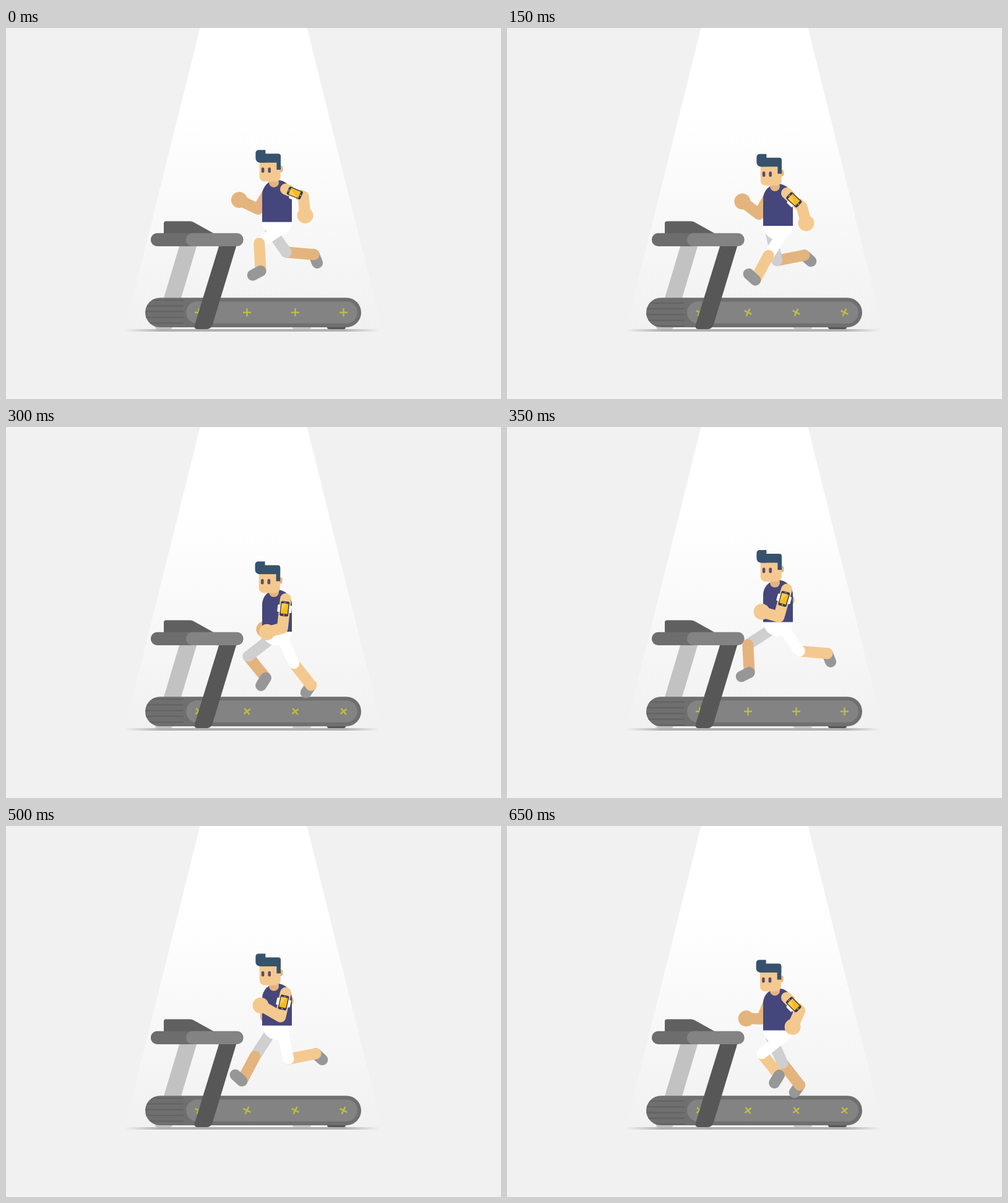
Write an HTML page with a canvas that moves like this. It is 800x600 px and loops after 700 ms.

```html
<!DOCTYPE html>
<html lang="en">
<head>
<meta charset="utf-8">
<title>Treadmill runner</title>
<style>
html, body { margin: 0; width: 100%; height: 100%; overflow: hidden; background: #f1f1f1; }
canvas { display: block; width: 800px; height: 600px; }
</style>
</head>
<body>
<canvas id="stage" width="800" height="600"></canvas>
<script>
const ctx = document.getElementById('stage').getContext('2d');
const LOOP = 700, HALF = LOOP / 2, STEP = 50;
const SKIN = '#f4c98f', SKIN_FAR = '#e4b47e', SHOE = '#979797', SHIRT = '#45467b', HAIR = '#36526d';
const THIGH = 45, SHIN = 45, FOOT = 14.5;

// One stride, shared by both legs: time, then forward angles of thigh, shin and foot
const STRIDE = [
  [0, 57, -3, 63],
  [150, 33, 28, 132],
  [250, 28, -36, 90],
  [300, -24, -38, 35],
  [350, -35, -85, -22],
  [500, -12, -101, -48],
  [600, 27, -90, -42],
  [650, 52, -39, 32]
];

// Smooth periodic curve through the keys
function sample(keys, t) {
  const n = keys.length;
  const key = i => {
    const lap = Math.floor(i / n), row = keys[i - lap * n];
    return [row[0] + lap * LOOP, ...row.slice(1)];
  };
  let i = n - 1;
  while (keys[i][0] > t) i--;
  const [a, b, c, d] = [key(i - 1), key(i), key(i + 1), key(i + 2)];
  const span = c[0] - b[0], s = (t - b[0]) / span, s2 = s * s, s3 = s2 * s;
  return b.slice(1).map((v, k) => {
    const j = k + 1;
    const m0 = (c[j] - a[j]) / (c[0] - a[0]), m1 = (d[j] - b[j]) / (d[0] - b[0]);
    return (2 * s3 - 3 * s2 + 1) * v + (3 * s2 - 2 * s3) * c[j]
      + span * ((s3 - 2 * s2 + s) * m0 + (s3 - s2) * m1);
  });
}

// Cosine with its crest at a given time, beating a number of times per loop
const wave = (t, crest, beats = 1) => Math.cos(beats * 2 * Math.PI * (t - crest) / LOOP);

const hemHeight = t =>
  322 + 14.5 * wave(t, 240, 2) - 2.3 * wave(t, 20, 4) + 1.5 * wave(t, 450);

const nearArm = (t, hem) => ({
  shoulder: [452, hem - 53],
  elbow: [460 + 24 * wave(t, 60), hem - 22 + 17 * wave(t, 380) + 7 * wave(t, 240, 2)],
  hand: [446 + 46 * wave(t, 75) + 7 * wave(t, 75, 2), hem - 13 + 14 * wave(t, 150) + 14 * wave(t, 260, 2)]
});

const farArm = (t, hem) => ({
  shoulder: [425, hem - 50],
  elbow: [430 + 31 * wave(t, 425) + 7 * wave(t, 425, 2), hem - 27 + 12 * wave(t, 100) + 8.5 * wave(t, 255, 2)],
  hand: [402 - 30 * wave(t, 65), hem - 22 + 16 * wave(t, 420) + 14 * wave(t, 260, 2)]
});

function box(color, x, y, w, h, r = 0) {
  ctx.fillStyle = color;
  ctx.beginPath();
  ctx.roundRect(x, y, w, h, r);
  ctx.fill();
}

function shape(color, ...points) {
  ctx.fillStyle = color;
  ctx.beginPath();
  points.forEach(p => ctx.lineTo(...p));
  ctx.fill();
}

function disc(color, x, y, r, end = Math.PI * 2) {
  ctx.fillStyle = color;
  ctx.beginPath();
  ctx.arc(x, y, r, 0, end);
  ctx.fill();
}

function limb(color, points, cap = 'round') {
  ctx.strokeStyle = color;
  ctx.lineWidth = 18;
  ctx.lineCap = cap;
  ctx.lineJoin = 'round';
  ctx.beginPath();
  points.forEach(p => ctx.lineTo(...p));
  ctx.stroke();
}

function gradient(x0, y0, x1, y1, ...stops) {
  const g = ctx.createLinearGradient(x0, y0, x1, y1);
  stops.forEach(s => g.addColorStop(...s));
  return g;
}

function drawRoom() {
  box('#f1f1f1', 0, 0, 800, 600);
  shape(gradient(0, 0, 0, 488, [0, '#fff'], [0.29, '#fff'], [1, '#f1f1f1']),
    [313.5, 0], [486.5, 0], [608, 488], [192, 488]);
  box(gradient(192, 0, 603, 0, [0, '#b0b0b000'], [0.14, '#b0b0b0'], [0.86, '#b0b0b0'], [1, '#b0b0b000']),
    192, 487, 411, 4);
}

function drawRoller(t) {
  const gap = 9.3;
  ctx.save();
  ctx.beginPath();
  ctx.roundRect(225, 437, 120, 46.5, 23);
  ctx.clip();
  const shift = gap / 2 * (t / STEP % 2);
  for (let y = 440 - shift; y < 484; y += gap) box('#636363', 225, y - 1, 62, 2.2, 1);
  ctx.restore();
}

function drawTreadmill(t) {
  shape('#c2c2c2', [281, 350], [309, 350], [282, 440], [254, 440]);
  box('#c2c2c2', 241, 478, 28, 9, 4);
  box('#c6c6c6', 463, 478, 30, 9, 3);
  box('#565656', 519, 478, 30, 9, 3);

  box('#6f6f6f', 225, 436.3, 349, 47.7, 23.8);
  drawRoller(t);
  box('#838383', 291, 442.3, 277, 35.5, 17.7);

  for (let i = 0; i < 4; i++) {
    ctx.save();
    ctx.translate(311.5 + i * 78, 460);
    ctx.rotate(3 * Math.PI * t / LOOP);
    box('#bdbe45', -6.5, -1.2, 13, 2.4);
    box('#bdbe45', -1.2, -6.5, 2.4, 13);
    ctx.restore();
  }

  ctx.fillStyle = '#575757';
  ctx.beginPath();
  ctx.moveTo(345, 350);
  ctx.lineTo(373, 350);
  ctx.lineTo(334, 479);
  ctx.quadraticCurveTo(331, 487, 325, 487);
  ctx.lineTo(309, 487);
  ctx.quadraticCurveTo(303, 487, 305, 480);
  ctx.fill();

  ctx.fillStyle = '#606060';
  ctx.beginPath();
  ctx.moveTo(255, 334);
  ctx.lineTo(255, 316);
  ctx.quadraticCurveTo(255, 312.5, 258.5, 312.5);
  ctx.lineTo(297, 312.5);
  ctx.quadraticCurveTo(301, 312.5, 304, 314.5);
  ctx.lineTo(339, 334);
  ctx.fill();
  box('#6d6d6d', 234, 331.7, 100, 21.3, 10.6);
  box('#838383', 291, 331.7, 92.7, 21.3, 10.6);
}

function extend([x, y], length, degrees) {
  const a = degrees * Math.PI / 180;
  return [x - length * Math.sin(a), y + length * Math.cos(a)];
}

function drawLeg(phase, hip, cloth, skin) {
  const [thighAngle, shinAngle, footAngle] = sample(STRIDE, phase);
  const knee = extend(hip, THIGH, thighAngle);
  const ankle = extend(knee, SHIN, shinAngle);
  const toe = extend(ankle, FOOT, footAngle);
  const reaching = phase < 275;
  const shoe = () => limb(SHOE, [ankle, toe]);
  const shin = () => limb(skin, [knee, ankle]);
  const thigh = () => limb(cloth, [hip, knee], reaching ? 'butt' : 'round');
  if (reaching) [thigh, shin, shoe].forEach(draw => draw());
  else if (phase > 625) [shin, shoe, thigh].forEach(draw => draw());
  else [shoe, shin, thigh].forEach(draw => draw());
}

function drawArm({ shoulder, elbow, hand }, skin) {
  limb(skin, [shoulder, elbow, hand]);
  disc(skin, ...hand, 13);
}

function drawPhone({ shoulder: [sx, sy], elbow: [ex, ey] }) {
  ctx.save();
  ctx.translate(sx, sy);
  ctx.rotate(Math.atan2(ey - sy, ex - sx) - Math.PI / 2);
  ctx.translate(0, 16);
  box('#fff', -11.5, -6, 23, 12, 1.5);
  box('#3c3a48', -7, -12, 14, 24, 2.5);
  box('#fbbb21', -5.5, -8.3, 11, 16.4);
  shape('#ffcd4e', [-5.5, -8.3], [3, -8.3], [-5.5, 6]);
  box('#c9c9cf', -1.8, -10.6, 3.6, 0.9);
  disc('#c9c9cf', 0, 10, 1);
  ctx.restore();
}

function drawHead(hem) {
  const sink = Math.max(0, (hem - 325) * 0.46);
  ctx.save();
  ctx.translate(-0.3 * sink, hem - 116.4 + sink);
  box(SKIN_FAR, 440, 25.5, 7.3, 10.5, 3);
  box(SKIN, 409.7, 14, 34, 37, [0, 0, 8, 8]);
  box('#5e4b70', 412.8, 28.3, 4.6, 8.8, 2.3);
  box('#5e4b70', 423.4, 28.3, 4.6, 8.8, 2.3);
  box(HAIR, 403.4, 0, 16, 20.5, [5, 0, 0, 7]);
  box(HAIR, 410, 6, 34, 14.5, [0, 4, 0, 0]);
  box(HAIR, 437.4, 10, 6.6, 22);
  ctx.restore();
}

function drawRunner(t) {
  const hem = hemHeight(t), arm = nearArm(t, hem);
  drawArm(farArm(t, hem), SKIN_FAR);
  drawLeg((t + HALF) % LOOP, [427, hem + 12], '#cfcfcf', SKIN_FAR);
  drawLeg(t, [447, hem + 10], '#fff', SKIN);
  disc('#fff', 438, hem - 1, 24, Math.PI);
  box(SHIRT, 414, hem - 68, 48, 68, [24, 24, 0, 0]);
  disc(SKIN_FAR, 433, hem - 64, 8);
  drawHead(hem);
  drawArm(arm, SKIN);
  drawPhone(arm);
}

const start = performance.now();
function frame() {
  const elapsed = Math.max(0, performance.now() - start) % LOOP;
  const t = Math.floor(elapsed / STEP) * STEP;
  drawRoom();
  drawTreadmill(t);
  drawRunner(t);
  requestAnimationFrame(frame);
}
frame();
</script>
</body>
</html>
```
